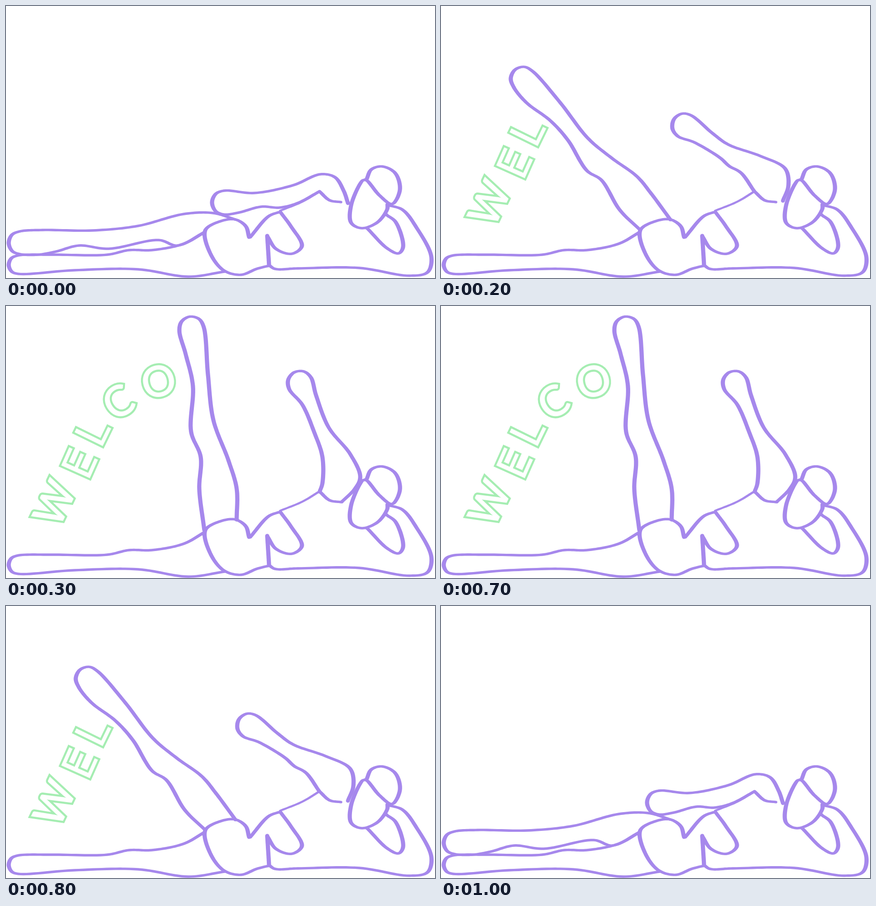
These frames come from a looping animation (941 by 595 pixels, 1.1 s). An HTML page:

```html
<!DOCTYPE html>
<html lang="en">
<head>
<meta charset="utf-8">
<title>Welcome</title>
<style>
  html, body { margin: 0; width: 100%; height: 100%; overflow: hidden; background: #fff; }
  svg { display: block; width: 100vw; height: 100vh; }
  text {
    font: 600 94px Lato, "Open Sans", sans-serif;
    text-anchor: middle;
    fill: #fff; stroke: #a5edb2; stroke-width: 9; stroke-linejoin: miter; paint-order: stroke;
  }
  text.wide { font: 400 94px "DejaVu Sans", sans-serif; }
</style>
</head>
<body>
<svg viewBox="0 0 941 595">
  <g id="word"></g>
  <g fill="#a688ec">
    <path id="body"/>
    <path id="limbs"/>
  </g>
</svg>
<script>
// Key points "x,y" joined by a smooth curve; "x,y,r" is a round hand or foot.
const parse = text => text.split(' ').map(p => p.split(',').map(Number));

const BODY = {
  hair: '791,379 801,358 825,351 854,366 864,402 847,433 820,415 793,383 787,380',
  face: '787,380 781,383 757,436 757,474 780,486 815,473 836,445 837,434',
  back: '836,435 870,446 900,484 933,549 925,582 885,590 775,573 640,574 590,575 577,567',
  elbow: '835,457 855,473 871,527 861,541 836,530 792,486',
  rib: '577,567 576,550 573,503',
  chest: '573,503 592,531 627,542 649,525 625,482 602,451',
  waist: '602,450 576,460 536,505',
  hips: '533,505 526,482 503,467 470,471 437,491 448,541 477,578 515,588 550,575 577,568',
  armpit: '688,406 710,425 735,429',
  restingLeg: '437,494 390,520 320,534 270,534 222,544 100,544 26,566,20 150,578 290,576 400,592 480,581'
};
const SHOULDER = '601,448 650,428 687,406';

const pose = (letters, leg, arm) => ({ letters, leg: parse(leg), arm: parse(arm) });
const lying = pose(0,
  '503,467 455,453 390,455 290,481 190,491 80,490 31,518,25 70,544 110,537 160,524 225,531 335,512 376,524 437,494',
  '750,431 741,405 722,375 690,368 630,392 545,409 478,430,26 510,452 560,439 600,441 640,431 687,406');
const lifted = pose(3,
  '503,467 460,409 430,373 375,333 322,289 262,212 180,160,27 187,211 240,251 278,293 320,360 352,381 392,446 437,490',
  '750,426 762,393 755,356 700,328 630,303 595,278 534,262,27 555,298 612,332 632,350 658,365 687,405');
const upright = pose(5,
  '506,467 506,400 488,338 455,250 443,150 407,50,27 394,105 410,175 406,275 427,330 424,400 435,490',
  '737,428 765,400 777,374 755,324 708,266 680,195 645,169,27 650,216 676,276 694,330 694,388 688,406');
const touching = pose(8,
  '528,480 563,452 598,375 621,280 645,230 690,155 685,99,28 643,130 625,200 565,280 525,371 438,488',
  '737,429 772,393 770,345 742,270 734,190 709,167,26 697,215 707,280 712,330 702,382 688,406');

// Swings a limb around its joint, part of the way from one position to another.
function swing(from, to, [jx, jy], k) {
  const mix = (a, b) => a + (b - a) * k;
  return from.map(([x, y, r], i) => {
    const [u, v] = to[i];
    const angle = mix(Math.atan2(jy - y, jx - x), Math.atan2(jy - v, jx - u));
    const reach = mix(Math.hypot(jx - x, jy - y), Math.hypot(jx - u, jy - v));
    return [jx - reach * Math.cos(angle), jy - reach * Math.sin(angle), r];
  });
}
const rising = {
  letters: 1,
  leg: swing(lying.leg, lifted.leg, [510, 480], .6),
  arm: swing(lying.arm, lifted.arm, [770, 420], .6)
};
const POSES = [lying, rising, lifted, upright, touching];

// Turns each round end into a half circle that points away from its limb.
function roundEnds(points) {
  return points.flatMap(([x, y, r], i) => {
    if (!r) return [[x, y]];
    const [a, b] = [points[i - 1], points[i + 1]];
    const aim = Math.atan2(y - (a[1] + b[1]) / 2, x - (a[0] + b[0]) / 2);
    return [2, 1, 0, -1, -2].map(n => {
      const angle = aim + n * Math.PI / 4;
      return [x + r * Math.cos(angle), y + r * Math.sin(angle)];
    });
  });
}

// Smooth line through the points, with speeds that suit uneven spacing.
function curve(points) {
  const last = points.length - 1, parts = 14;
  const gap = i => Math.sqrt(Math.hypot(points[i + 1][0] - points[i][0], points[i + 1][1] - points[i][1]));
  const slope = (i, k) => (points[i + 1][k] - points[i][k]) / gap(i);
  const speed = (i, k) => {
    if (i === 0) return slope(0, k);
    if (i === last) return slope(last - 1, k);
    const a = gap(i - 1), b = gap(i);
    return (slope(i - 1, k) * b + slope(i, k) * a) / (a + b);
  };
  const line = [];
  for (let i = 0; i < last; i++)
    for (let j = 0; j < parts; j++) {
      const t = j / parts, u = 1 - t, h = gap(i);
      line.push([0, 1].map(k =>
        u * u * (1 + 2 * t) * points[i][k] + t * t * (3 - 2 * t) * points[i + 1][k]
        + h * t * u * (u * speed(i, k) - t * speed(i + 1, k))));
    }
  line.push(points[last]);
  return line;
}

const dot = (x, y, r) => `M${x - r} ${y}a${r} ${r} 0 1 0 ${2 * r} 0a${r} ${r} 0 1 0 ${-2 * r} 0Z`;

// A pen that is thin along level lines and broad along upright ones.
function brush(points, weight = 1) {
  const line = curve(roundEnds(points)), end = line.length - 1;
  const left = [], right = [];
  let caps = '';
  line.forEach(([x, y], i) => {
    const p = line[Math.max(0, i - 1)], q = line[Math.min(end, i + 1)];
    const length = Math.hypot(q[0] - p[0], q[1] - p[1]) || 1;
    const dx = (q[0] - p[0]) / length, dy = (q[1] - p[1]) / length;
    const r = weight * (5.4 + 3.8 * dy * dy) / 2;
    left.push(`${(x - dy * r).toFixed(1)} ${(y + dx * r).toFixed(1)}`);
    right.unshift(`${(x + dy * r).toFixed(1)} ${(y - dx * r).toFixed(1)}`);
    if (i === 0 || i === end) caps += dot(x, y, r);
  });
  return `M${left.concat(right).join('L')}Z${caps}`;
}

// character, centre x, centre y, angle
const WORD = [
  ['W', 106, 431, -64.5], ['E', 161, 344, -66], ['L', 189, 276, -64], ['C', 246, 209, -32],
  ['O', 334.5, 164, -15], ['M', 438.5, 137, 0], ['E', 531, 132, -3], ['!', 589, 129, 2]
];

const get = id => document.getElementById(id);
const limbs = get('limbs');
get('body').setAttribute('d',
  Object.values(BODY).map(part => brush(parse(part))).join('') + brush(parse(SHOULDER), .75));
for (const p of POSES) p.path = brush(p.leg) + brush(p.arm);

const glyphs = WORD.map(([char, x, y, angle]) => {
  const el = document.createElementNS('http://www.w3.org/2000/svg', 'text');
  el.textContent = char;
  el.setAttribute('y', 34);
  el.setAttribute('transform', `translate(${x} ${y}) rotate(${angle})`);
  if ('EL'.includes(char)) el.setAttribute('class', 'wide');
  get('word').append(el);
  return el;
});

const STEP = 100, STEPS = 11;
let shown;

// Up through the poses, a hold at the top, and back down.
function draw(time) {
  const step = Math.floor(time / STEP) % STEPS;
  const now = POSES[Math.min(step, POSES.length - 1, STEPS - 1 - step)];
  if (now === shown) return;
  shown = now;
  limbs.setAttribute('d', now.path);
  glyphs.forEach((el, i) => el.setAttribute('visibility', i < now.letters ? 'visible' : 'hidden'));
}

const start = performance.now();
function tick() {
  draw(performance.now() - start);
  requestAnimationFrame(tick);
}
tick();
</script>
</body>
</html>
```
